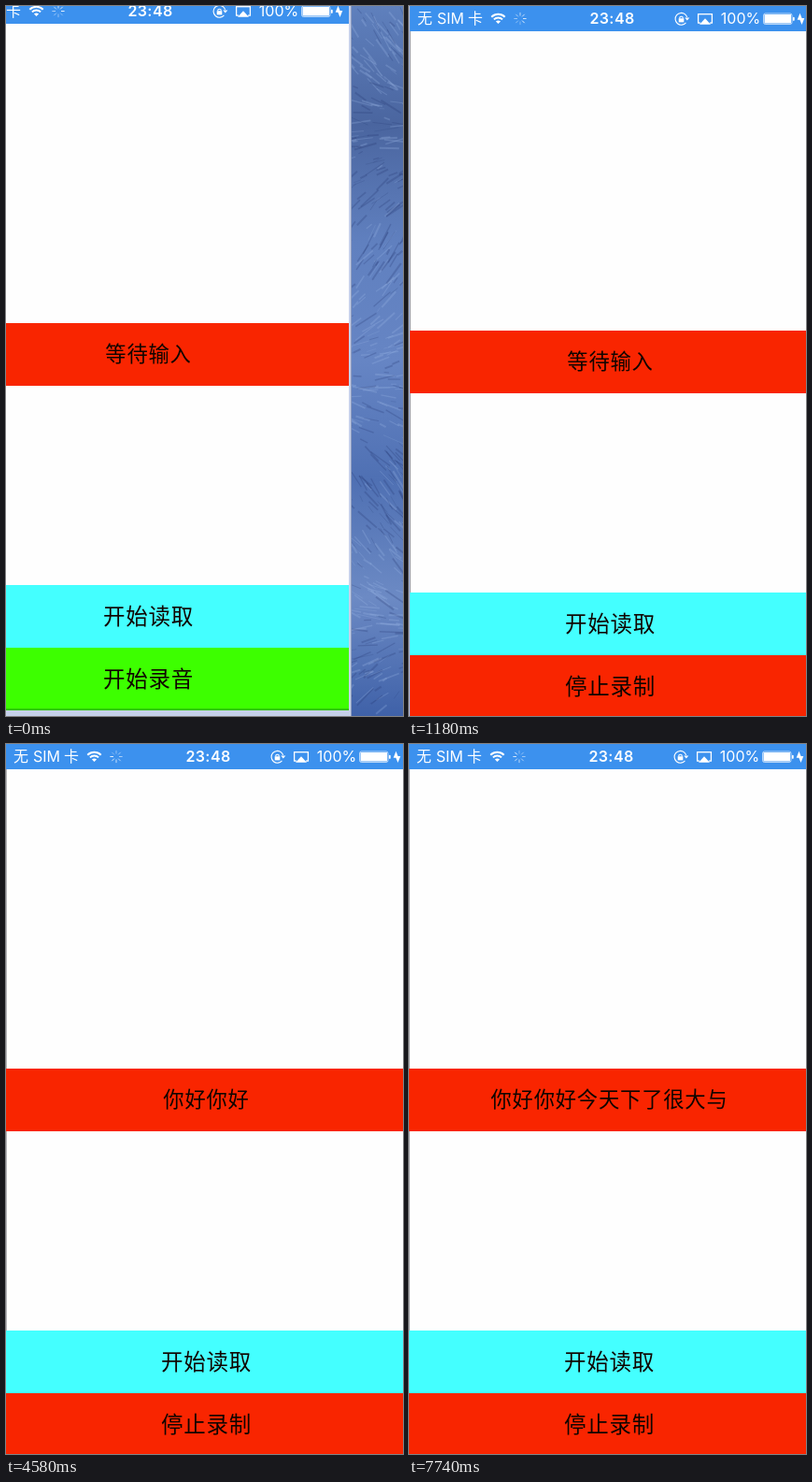
Animation, 425 px wide and 759 px high, one loop 7.84 s. Source, as an HTML page with a canvas:

```html
<!DOCTYPE html>
<html lang="zh-CN">
<head>
<meta charset="utf-8">
<title>语音输入</title>
<style>
  html, body { margin: 0; width: 100%; height: 100%; overflow: hidden; background: #fefefe; }
  canvas { display: block; width: 425px; height: 759px; }
</style>
</head>
<body>
<canvas id="stage" width="425" height="759"></canvas>
<script>
const ctx = document.getElementById('stage').getContext('2d');
const W = 425, H = 759;
const LOOP = 7840, STEP = 147.4;
const LEFT = -6, RIGHT = 423, BOTTOM = 762, MIDDLE = 208.5, ROW = 67;
const CJK = '"Noto Sans CJK SC", "Noto Sans CJK", sans-serif';
const LATIN = 'Inter, Roboto, sans-serif';
const RED = '#f92500';
const PROMPT = '等待输入', PHRASE = '你好你好今天下了很大与';

const mix = (a, b, t) => a + (b - a) * Math.min(1, Math.max(0, t));

// The screen is dragged in from the left, overshoots and settles back.
function screenPos(t) {
  const x = t < 600
    ? mix(-56, 0, t / 300) + mix(0, 13, (t - 300) / 300)
    : mix(13, 6, (t - 600) / 720);
  const y = mix(-9, 0, t / 300) - mix(0, 1, (t - 300) / 150);
  return [Math.round(x), Math.round(y)];
}

// Two words arrive whole, then one character per step.
function heard(t) {
  if (t < 3100) return PROMPT;
  if (t < 4280) return PHRASE.slice(0, 2);
  return PHRASE.slice(0, 4 + Math.max(0, Math.floor((t - 5610) / 150)));
}

function rect(x, y, w, h, color = '#fff') {
  ctx.fillStyle = color;
  ctx.fillRect(x, y, w, h);
}

function rounded(x, y, w, h, r) {
  ctx.beginPath();
  ctx.roundRect(x, y, w, h, r);
}

function text(str, x, y, font, { color = '#fff', align = 'left', gap = 0 } = {}) {
  ctx.font = font;
  ctx.fillStyle = color;
  ctx.textAlign = align;
  ctx.letterSpacing = gap + 'px';
  ctx.fillText(str, x, y);
}

function line(x1, y1, x2, y2, width, color) {
  ctx.beginPath();
  ctx.moveTo(x1, y1);
  ctx.lineTo(x2, y2);
  ctx.lineWidth = width;
  ctx.strokeStyle = color;
  ctx.stroke();
}

function triangle(x, y, w, h) {
  ctx.beginPath();
  ctx.moveTo(x - w / 2, y);
  ctx.lineTo(x + w / 2, y);
  ctx.lineTo(x, y + h);
  ctx.fillStyle = '#fff';
  ctx.fill();
}

function arc(x, y, r, from, to, width) {
  ctx.beginPath();
  ctx.arc(x, y, r, from * Math.PI, to * Math.PI);
  ctx.lineWidth = width;
  ctx.strokeStyle = '#fff';
  ctx.stroke();
}

function makeRandom(seed) {
  return () => (seed = (seed * 16807) % 2147483647) / 2147483647;
}

// A rocky blue slope: shaded bands crossed by grooves that turn with height.
function slope(x, w, shades, seed) {
  const random = makeRandom(seed);
  const fill = ctx.createLinearGradient(0, 0, 0, H);
  shades.forEach((c, i) => fill.addColorStop(i / (shades.length - 1), c));
  ctx.save();
  ctx.beginPath();
  ctx.rect(x, 0, w, H);
  ctx.clip();
  rect(x, 0, w, H, fill);
  for (let i = 0; i < w * 9; i++) {
    const px = x + (random() * 1.4 - 0.4) * w, py = random() * H;
    const angle = 0.95 * Math.cos(py / 85) + random() * 0.5 - 0.25;
    const len = 5 + random() * 22;
    const light = random() < 0.5 + 0.25 * Math.sin(py / 45);
    line(px, py, px + len * Math.cos(angle), py + len * Math.sin(angle),
      0.6 + random() * 1.6, light ? 'rgba(160,187,232,.26)' : 'rgba(32,52,108,.24)');
  }
  ctx.restore();
}

function wallpaper(x) {
  const right = x + RIGHT + 3, left = x + LEFT - 3;
  if (right < W) slope(right, W - right,
    ['#5f80bd', '#4a659f', '#6080bf', '#6685c4', '#4f70b3', '#6c8ac4', '#3f61a8'], 71);
  if (left > 0) slope(0, left,
    ['#27375c', '#33466f', '#7391c4', '#4c6498', '#6d86b9', '#3e5f9f'], 23);
}

function spinner(x, y, head) {
  const count = 8;
  for (let i = 0; i < count; i++) {
    const a = i * 2 * Math.PI / count, c = Math.cos(a), s = Math.sin(a);
    const age = (head - i + count) % count;
    line(x + 3 * c, y + 3 * s, x + 6.6 * c, y + 6.6 * s, 1,
      `rgba(255,255,255,${0.85 - age * 0.07})`);
  }
}

function wifi(x, y) {
  for (const r of [10.2, 6.5]) arc(x, y, r, 1.25, 1.75, 2);
  arc(x, y, 1.8, 1.25, 1.75, 3.6);
}

function rotationLock(x, y) {
  arc(x, y, 6.4, 0.22, 1.9, 1.1);
  triangle(x + 6.3, y - 1.4, 5, 3.2);
  rect(x - 2.8, y - 0.6, 5.6, 4.2);
  arc(x, y - 0.8, 1.8, 1, 2, 1.1);
}

function airplay(x, y) {
  ctx.lineWidth = 1.3;
  ctx.strokeStyle = '#fff';
  ctx.strokeRect(x - 7.4, y - 5.1, 14.8, 9.4);
  rect(x - 5, y + 3, 10, 3, '#3c91ee');
  triangle(x, y + 6, 12, -6.6);
}

function battery(x, y) {
  ctx.lineWidth = 0.8;
  ctx.strokeStyle = 'rgba(255,255,255,.8)';
  rounded(x, y, 30.5, 11.5, 2);
  ctx.stroke();
  rect(x + 1, y + 1, 28.5, 9.5);
  rounded(x + 31.4, y + 3.8, 1.8, 4, 1);
  ctx.fill();
  triangle(x + 39, y + 6.8, 5.6, -7);
  triangle(x + 41, y + 5, 5.6, 7);
}

function statusBar(head) {
  const base = 20;
  rect(LEFT, 0, RIGHT - LEFT, 28, '#3c91ee');
  rect(LEFT, 0, RIGHT - LEFT, 1, '#7f9fca');
  text('无', 2, base, '300 16px ' + CJK);
  text('SIM', 23, base, '16px ' + LATIN);
  text('卡', 56, base, '300 16px ' + CJK);
  wifi(88.5, 20);
  spinner(112, 14.5, head);
  text('23:48', MIDDLE + 2, base, '600 16px ' + LATIN, { align: 'center', gap: 0.4 });
  rotationLock(284.5, 14.8);
  airplay(310, 14.8);
  text('100%', 348, base, '16px ' + LATIN, { align: 'center' });
  battery(372.5, 9);
}

function bar(y, color, str, pitch) {
  const size = pitch - 0.8;
  rect(LEFT, y, RIGHT - LEFT, ROW, color);
  text(str, MIDDLE, y + ROW / 2 - 0.7 + size * 0.38, `300 ${size}px ${CJK}`,
    { color: '#100500', align: 'center', gap: 0.8 });
}

function draw(t) {
  const [x, y] = screenPos(t);
  const recording = t >= 450;

  ctx.setTransform(1, 0, 0, 1, 0, 0);
  wallpaper(x);

  ctx.translate(x, y);
  rect(LEFT - 3, 0, RIGHT - LEFT + 6, BOTTOM + 8, '#c6d0ea');
  rect(LEFT - 1, 0, 1, BOTTOM, '#a9b8dc');
  rect(RIGHT + 2, 0, 1, BOTTOM + 8, '#8f9dbf');

  rect(LEFT, 0, RIGHT - LEFT, BOTTOM, '#fefefe');
  rect(LEFT, 28, 1, 600, '#b4b4b8');
  statusBar(Math.floor(t * 8 / 1000) % 8);
  bar(348, RED, heard(t), 23.1);
  bar(628, '#44ffff', '开始读取', 24.3);
  bar(628 + ROW, recording ? RED : '#3dff00', recording ? '停止录制' : '开始录音', 24.3);
  rect(LEFT, BOTTOM - 2, RIGHT - LEFT, 2, 'rgba(0,0,0,.22)');
}

const start = performance.now();
function loop() {
  const t = (performance.now() - start) % LOOP;
  draw(Math.ceil(Math.floor(t / STEP + 0.05) * STEP));
  requestAnimationFrame(loop);
}
loop();
</script>
</body>
</html>
```
